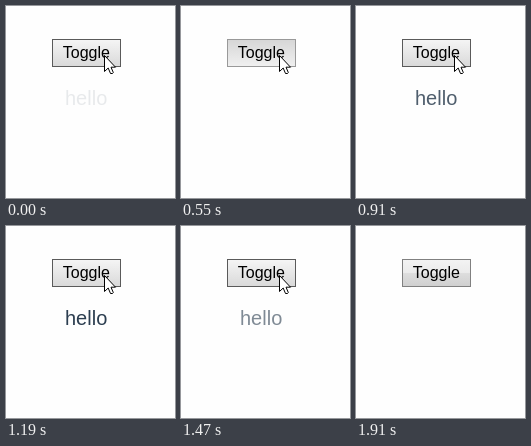
An HTML page that plays this animation: 169x192 px, repeating every 2.06 s.

```html
<!DOCTYPE html>
<html lang="en">
<head>
<meta charset="utf-8">
<title>Toggle fade</title>
<style>
  html, body { margin: 0; width: 100%; height: 100%; overflow: hidden; background: #fefefe; }
  svg { display: block; width: 169px; height: 192px; }
  text { font-family: Arial, "Liberation Sans", sans-serif; }
</style>
</head>
<body>
<svg viewBox="0 0 169 192">
  <defs>
    <linearGradient id="up" x2="0" y2="1">
      <stop stop-color="#f3f3f3"/><stop offset=".48" stop-color="#ebebeb"/>
      <stop offset=".52" stop-color="#dddddd"/><stop offset="1" stop-color="#cfcfcf"/>
    </linearGradient>
    <linearGradient id="hover" x2="0" y2="1">
      <stop stop-color="#f5f5f5"/><stop offset="1" stop-color="#d9d9d9"/>
    </linearGradient>
    <linearGradient id="down" x2="0" y2="1">
      <stop stop-color="#d6d6d6"/><stop offset="1" stop-color="#f0f0f0"/>
    </linearGradient>
  </defs>
  <rect id="button" x="46.5" y="33.5" width="68" height="27"/>
  <text x="56.8" y="52" font-size="16">Toggle</text>
  <text id="hello" x="59" y="99" font-size="20" fill="#2c3e50">hello</text>
  <path id="cursor" d="M.5 .5V16.5L4.2 13L6.5 18.5H8.5L9.3 17.5L7 12.2H11.5Z" fill="#fff" stroke="#000"/>
</svg>
<script>
const LOOP = 2060;
const get = id => document.getElementById(id);
const button = get('button'), hello = get('hello'), cursor = get('cursor');
const border = { up: '#808080', hover: '#5a5a5a', down: '#999999' };

// Each track lists [start in ms, value]; values hold until the next start.
const opacity = [[0, .1], [120, 0], [670, .21], [790, .52], [910, .83],
                 [1190, 1], [1470, .6], [1610, .21], [1760, 0]];
const state = [[0, 'hover'], [550, 'down'], [670, 'hover'],
               [1340, 'down'], [1470, 'hover'], [1610, 'up']];
const place = [[0, '98 49'], [1610, '128 139'], [1760, '141 178'], [1910, '200 240']];

const at = (track, t) => track.findLast(([start]) => start <= t)[1];

function draw(now) {
  const t = Math.max(0, now) % LOOP;
  const look = at(state, t);
  button.setAttribute('fill', `url(#${look})`);
  button.setAttribute('stroke', border[look]);
  hello.setAttribute('opacity', at(opacity, t));
  cursor.setAttribute('transform', `translate(${at(place, t)})`);
}

const begin = performance.now();
function tick() {
  draw(performance.now() - begin);
  requestAnimationFrame(tick);
}
tick();
</script>
</body>
</html>
```
